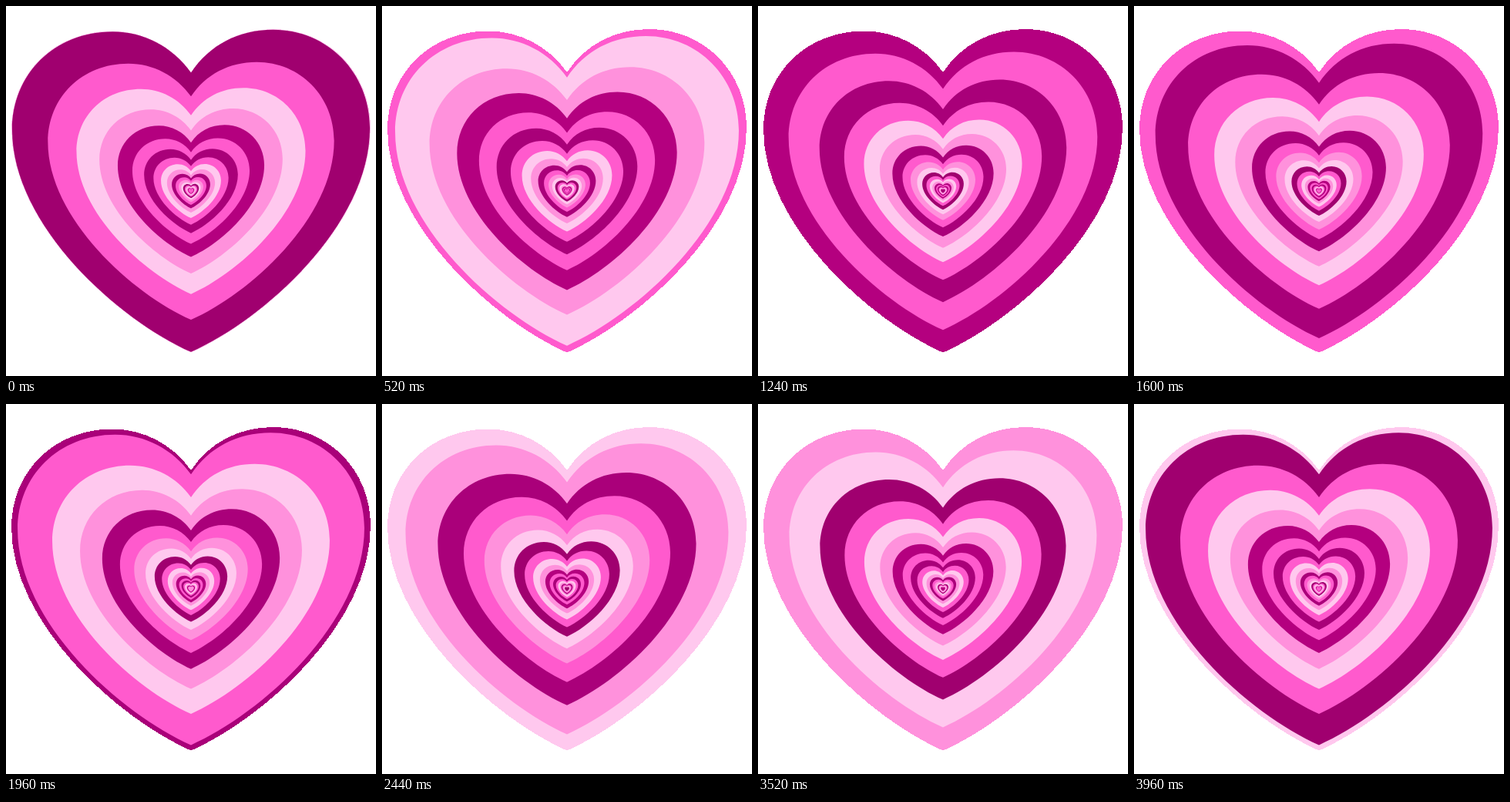
An HTML page for the animation above (4 s loop, 480 by 480 pixels).

```html
<!DOCTYPE html>
<html lang="en">
<head>
<meta charset="utf-8">
<title>Heart tunnel</title>
<style>
  html, body { margin: 0; width: 100%; height: 100%; overflow: hidden; background: #fff; }
  svg { display: block; width: 100%; height: 100%; }
  #rings :first-child { shape-rendering: crispEdges; }
</style>
</head>
<body>
<svg viewBox="0 0 480 480">
  <defs>
    <path id="heart" d="M240 86
      C216 52 178 32.5 138 32.5 C62 32.5 7 88 7 160 C7 285 146 408 240 449.7
      C334 408 473 285 473 158 C473 86 418 30 347 30 C302 30 264 50 240 86Z"/>
  </defs>
  <g id="rings"></g>
</svg>
<script>
const LOOP = 4000, STEP = 40;
const RATIO = 0.8, OFFSET = 0.018, DEPTH = 21;
const CENTER = 240;

const pink = '#ff5acd', soft = '#ff91dc', pale = '#ffc8ee';
const COLORS = [
  '#a0006f', pink, pale, soft, '#b4007f', pink, '#a90079',
  pink, pale, soft, '#aa007a', pink, soft, pale
];

const group = document.getElementById('rings');
const rings = Array.from({ length: DEPTH }, () => {
  const ring = document.createElementNS('http://www.w3.org/2000/svg', 'use');
  ring.setAttribute('href', '#heart');
  return group.appendChild(ring);
});

function draw(ms) {
  const time = Math.floor((ms % LOOP) / STEP) * STEP;
  const phase = COLORS.length * time / LOOP - OFFSET;
  const first = Math.floor(phase);
  rings.forEach((ring, i) => {
    const n = first + i;
    // Rings stop growing once they fill the silhouette.
    const scale = Math.min(1, RATIO ** (n - phase));
    ring.setAttribute('fill', COLORS[(n + COLORS.length) % COLORS.length]);
    ring.setAttribute('transform',
      `translate(${CENTER} ${CENTER}) scale(${scale}) translate(${-CENTER} ${-CENTER})`);
  });
}

const start = performance.now();
function tick() {
  draw(performance.now() - start);
  requestAnimationFrame(tick);
}
draw(0);
requestAnimationFrame(tick);
</script>
</body>
</html>
```
